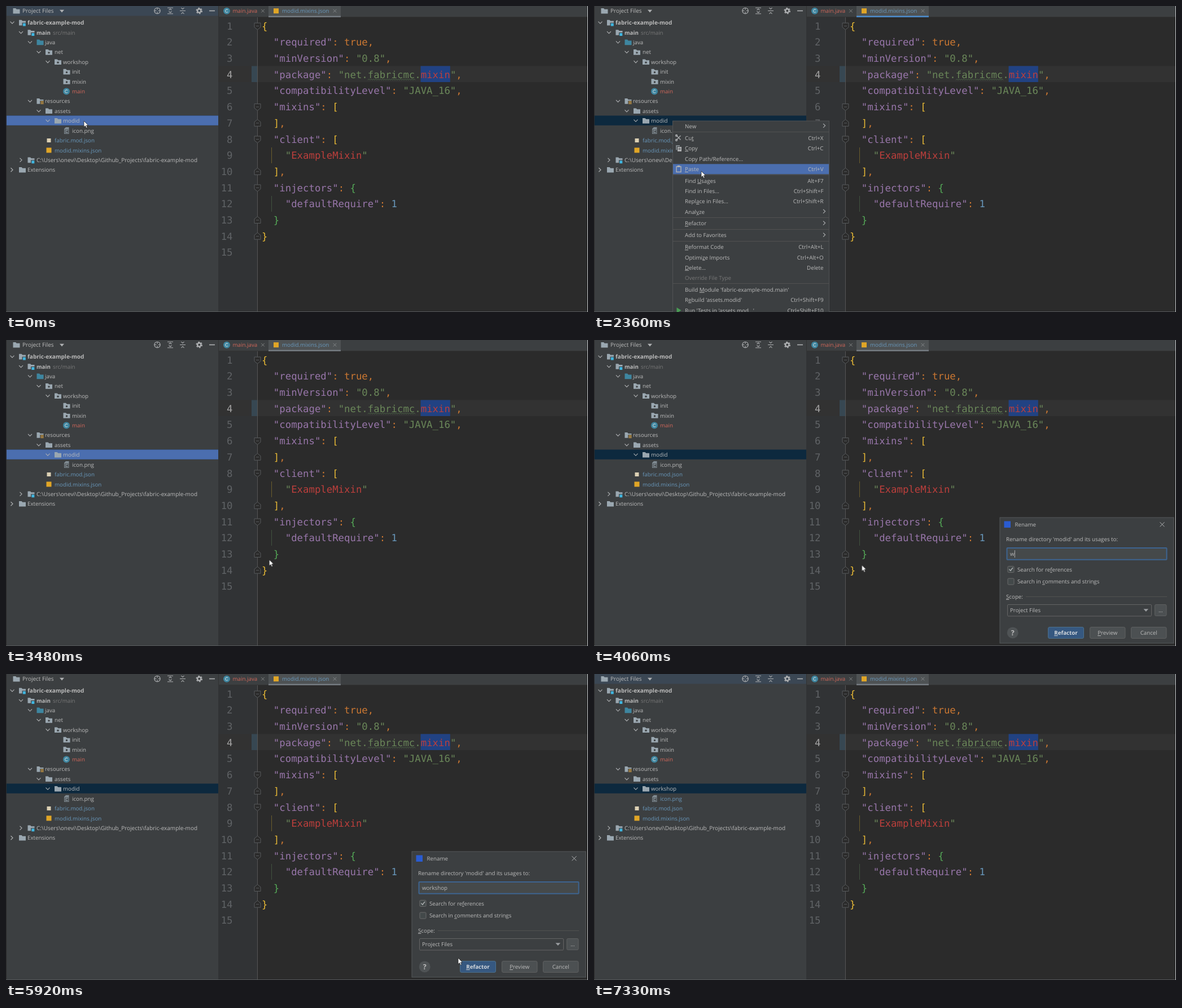
Animation, 1031 px wide and 543 px high, one loop 7350 ms. Source, as an HTML page:

```html
<!DOCTYPE html>
<html lang="en">
<head>
<meta charset="utf-8">
<title>Renaming a directory</title>
<style>
html, body { margin: 0; width: 100%; height: 100%; overflow: hidden; background: #2b2b2b; }
svg { display: block; width: 1031px; height: 543px; }
text { font: 9.75px "Open Sans", "Noto Sans", sans-serif; fill: #bbb; text-rendering: geometricPrecision; }
.code, .num { font: 17.33px "DejaVu Sans Mono", "Noto Sans Mono", monospace; }
.num { fill: #606366; text-anchor: end; }
.bold { font-weight: 700; }
.wide { font-size: 10px; }
.end { text-anchor: end; }
.mid { text-anchor: middle; }
.blue { fill: #6897bb; }
.red { fill: #d1675a; }
.dim { fill: #787878; }
.white { fill: #d4d8dc; }
.num.now { fill: #a4a3a3; }
.u { text-decoration: underline; }
.caret { font-size: 13px; }
.k { fill: #9876aa; } .o { fill: #cc7832; } .s { fill: #6a8759; } .r { fill: #bc3f3c; }
.y { fill: #e8ba36; } .g { fill: #54a857; } .n { fill: #6897bb; }
.line { fill: none; stroke: #afb1b3; stroke-width: 1.1; }
.step { animation: 7350ms step-end infinite; }
#dialog { transform-box: fill-box; transform-origin: center; animation: dialog 7350ms linear infinite; }
#cursor { animation: cursor 7350ms linear infinite; }
</style>
</head>
<body>
<script>
const LOOP = 7350;
let css = '', count = 0;
const pct = t => (t / LOOP * 100).toFixed(3) + '%';

// Visible only inside the given [from, to, from, to, ...] times
function show(body, ...times) {
  const name = 'v' + count++;
  const vis = on => `{visibility:${on ? 'visible' : 'hidden'}}`;
  css += `@keyframes ${name}{0%${vis(times[0] === 0)}` +
    times.map((t, i) => t < LOOP ? pct(t) + vis(i % 2 === 0) : '').join('') +
    `100%${vis(times[times.length - 1] === LOOP)}}`;
  return `<g class="step" style="animation-name:${name}">${body}</g>`;
}
function keyframes(name, list) {
  css += `@keyframes ${name}{${list.map(([t, rule]) => `${pct(t)}{${rule}}`).join('')}}`;
}

const rect = (x, y, w, h, fill, more = '') => `<rect x="${x}" y="${y}" width="${w}" height="${h}" fill="${fill}" ${more}/>`;
const box = (x, y, w, h, fill, stroke, r = 0) => rect(x + .5, y + .5, w - 1, h - 1, fill, `stroke="${stroke}" rx="${r}"`);
const line = (d, more = '') => `<path class="line" d="${d}" ${more}/>`;
const fill = (d, color) => `<path d="${d}" fill="${color}"/>`;
const disc = (x, y, r, color) => `<circle cx="${x}" cy="${y}" r="${r}" fill="${color}"/>`;
const plain = (x, cy, s, cls = '') => `<text x="${x}" y="${cy + 3.6}" class="${cls}">${s}</text>`;
// "_" marks the mnemonic letter
const label = (x, cy, s, cls) => plain(x, cy, s.replace(/_(\w)/, '<tspan class="u">$1</tspan>'), cls);

const down = (x, y) => line(`M${x - 3.5} ${y - 2}l3.5 3.6 3.5-3.6`);
const right = (x, y) => line(`M${x - 2} ${y - 3.5}l3.6 3.5-3.6 3.5`);
const cross = (x, y, r, color) => line(`M${x - r} ${y - r}l${2 * r} ${2 * r}m0-${2 * r}l-${2 * r} ${2 * r}`, `style="stroke:${color};stroke-width:1"`);
const folder = (x, y, color = '#9aa7b0') => fill(`M${x} ${y - 4.8}h4.6l1.6 1.8h5.8v7.8h-12z`, color);
const pack = (x, y) => folder(x, y) + disc(x + 6, y + 1, 1.7, '#3c3f41');
const module = (x, y) => folder(x, y) + rect(x + 5.6, y, 7, 6.5, '#3c3f41') + rect(x + 6.8, y + 1, 5, 5, '#40b6e0');
const resource = (x, y) => folder(x, y) + rect(x + 5.8, y - .8, 7, 7, '#3c3f41') +
  [0, 2, 4].map(i => rect(x + 6.8, y + i, 5.4, 1.1, '#d9a343')).join('');
const javaClass = (x, y) => disc(x, y, 6, '#3e86a0') + line(`M${x + 2.1} ${y - 1.7}a2.6 2.6 0 1 0 0 3.4`, 'style="stroke:#b9ccd4"');
const image = (x, y) => fill(`M${x + 4} ${y - 6}h5.5v12h-8.5v-9z`, '#7f8a91') + rect(x + 2, y - 2, 6.5, 7, '#4a4f52') +
  line(`M${x + 3} ${y - .5}h4.5m-4.5 2h2m-2 2h4.5`, 'style="stroke:#9aa7b0;stroke-width:1"');
const square = (x, y, color, size = 9) => rect(x, y - size / 2, size, size, color);

function tree() {
  const row = i => 29.6 + 17.41 * i;
  const y = row(10);
  const rows = [
    [38, 'fabric-example-mod', 'bold wide', module(23, row(0))],
    [54, 'main', 'bold', module(38.5, row(1)) + label(83, row(1), 'src/main', 'dim')],
    [69, 'java', '', folder(54.5, row(2), '#3e86a0')],
    [86, 'net', '', pack(70, row(3))],
    [101, 'workshop', '', pack(86, row(4))],
    [117, 'init', '', pack(101.5, row(5))],
    [117, 'mixin', '', pack(101.5, row(6))],
    [117, 'main', 'red', javaClass(107, row(7))],
    [69, 'resources', '', resource(54.5, row(8))],
    [86, 'assets', '', folder(70, row(9))],
    [101, '', '', folder(86, y)],
    [117, '', '', image(102, row(11))],
    [86, 'fabric.mod.json', 'blue', square(72.5, row(12), '#dbd0b4', 7)],
    [86, 'modid.mixins.json', 'blue', square(71.5, row(13), '#e0a526')],
    [54, 'C:\\Users\\onevi\\Desktop\\Github_Projects\\fabric-example-mod', 'wide', module(38.5, row(14))],
    [38, 'Extensions', '', folder(23, row(15))]
  ];
  const open = [[11, 0], [26.5, 1], [42.5, 2], [58, 3], [74, 4], [42.5, 8], [58, 9], [74, 10]];
  return rect(0, 0, 376, 543, '#3c3f41') +
    show(rect(1, 0, 375, 17.5, '#3b4754'), 0, 1170, 6290, LOOP) +
    folder(12.5, 8.8) + label(29, 8.8, 'Project Files', 'wide') + fill('M95 6.8h8l-4 4.8z', '#afb1b3') +
    line('M262.5 8.5h3.7m3.6 0h3.7M268 3v3.7m0 3.6V14') + `<circle class="line" cx="268" cy="8.5" r="5.2"/>` +
    line('M286 3.2h10M286 13.8h10M288.5 7.2l2.5-2 2.5 2M288.5 9.8l2.5 2 2.5-2') +
    line('M308 8.5h10M310.5 3.2l2.5 2.4 2.5-2.4M310.5 13.8l2.5-2.4 2.5 2.4') +
    `<circle class="line" cx="342.3" cy="8.5" r="3.2" style="stroke-width:2.4"/>` +
    `<circle class="line" cx="342.3" cy="8.5" r="5" style="stroke-width:1.6" stroke-dasharray="2.6 2.636"/>` +
    line('M360 8.5h10', 'style="stroke-width:1.6"') +
    rect(1, 194.5, 375, 17.3, '#0d293e') +
    show(rect(1, 194.5, 375, 17.3, '#4b6eaf'), 0, 1110, 3420, 3600, 6290, 7330) +
    open.map(([x, i]) => down(x, row(i))).join('') + right(26.5, row(14)) + right(10.5, row(15)) +
    rows.map(([x, s, cls, icon], i) => icon + plain(x, row(i), s, cls)).join('') +
    show(label(101, y, 'modid'), 0, 6290) + show(label(101, y, 'workshop'), 6290, LOOP) +
    show(label(117, row(11), 'icon.png'), 0, 6980) + show(label(117, row(11), 'icon.png', 'blue'), 6980, LOOP);
}

function editor() {
  const row = n => 35.6 + 28.7 * (n - 1);
  const code = [
    [0, 'y{'],
    [2, 'k"required"~o: true,'],
    [2, 'k"minVersion"~o: ~s"0.8"~o,'],
    [2, 'k"package"~o: ~s"net.fabricmc.~rmixin~s"~o,'],
    [2, 'k"compatibilityLevel"~o: ~s"JAVA_16"~o,'],
    [2, 'k"mixins"~o: ~y['],
    [2, 'y]~o,'],
    [2, 'k"client"~o: ~y['],
    [4, 's"~rExampleMixin~s"'],
    [2, 'y]~o,'],
    [2, 'k"injectors"~o: ~g{'],
    [4, 'k"defaultRequire"~o: ~n1'],
    [2, 'g}'],
    [0, 'y}'],
    [0, '']
  ];
  const spans = s => s && s.split('~').map(p => `<tspan class="${p[0]}">${p.slice(1)}</tspan>`).join('');
  const fold = (n, dir) => `<path d="M440 ${row(n) - 5.5 * dir}h11v${7.5 * dir}l-5.5 ${4.5 * dir}-5.5 ${-4.5 * dir}zM443 ${row(n)}h5" fill="#2b2b2b" stroke="#585b5d"/>`;
  return rect(376, 20, 655, 523, '#2b2b2b') + rect(376, 20, 69, 523, '#313335') +
    rect(376, 106.5, 655, 28.5, '#323232') + rect(435, 106.5, 10, 28.5, '#374752') +
    rect(445, 20, 1, 523, '#555555') + rect(734.5, 106.5, 52.3, 28.5, '#214283') +
    rect(470, 251, 1, 28, '#6b5d2d') + rect(470, 337, 1, 28, '#41523f') +
    [1, 6, 8, 11].map(n => fold(n, 1)).join('') + [7, 10, 13, 14].map(n => fold(n, -1)).join('') +
    line('M641 131.5' + 'l2-2 2 2'.repeat(21), 'style="stroke:#557a50;stroke-width:.7"') +
    code.map(([col, s], i) => {
      const y = row(i + 1) + 6;
      return `<text class="num${i === 3 ? ' now' : ''}" x="401.5" y="${y}">${i + 1}</text>` +
        `<text class="code" x="${453 + 10.43 * col}" y="${y}">${spans(s)}</text>`;
    }).join('') +
    rect(376, 0, 655, 20, '#3c3f41') + rect(376, 19, 655, 1, '#323232') + rect(376, 0, 1, 20, '#323232') +
    javaClass(391, 8.7) + label(401.5, 8.7, 'main.java', 'red') + cross(455, 8.7, 2.8, '#7f8182') +
    rect(465, 0, 128, 17.5, '#4e5254') + rect(465, 17.4, 128, 2.6, '#747a80') +
    show(rect(465, 17.4, 128, 2.6, '#4a88c7'), 1110, 3420) +
    square(474, 8.7, '#e0a526') + label(489, 8.7, 'modid.mixins.json', 'blue') + cross(582.5, 8.7, 2.8, '#84888a');
}

const sep = (x, y, w) => rect(x, y, w, 1, '#515151');
const hover = (x, cy, w, ...times) => show(rect(x, cy - 9, w, 18, '#4b6eaf'), ...times);

function menu() {
  const items = [
    [213, 'New', '>'], [234.2, 'Cu_t', 'Ctrl+X'], [252.6, '_Copy', 'Ctrl+C'], [271, 'Copy Path/Reference...'],
    [289.4, '_Paste', 'Ctrl+V'], [310, 'Find _Usages', 'Alt+F7'], [328.3, 'Find in Files...', 'Ctrl+Shift+F'],
    [346.6, 'Repl_ace in Files...', 'Ctrl+Shift+R'], [365, 'Anal_yze', '>'], [385.8, '_Refactor', '>'],
    [406.8, 'Add to Favorites', '>'], [427.8, '_Reformat Code', 'Ctrl+Alt+L'], [446, 'Optimi_ze Imports', 'Ctrl+Alt+O'],
    [464, '_Delete...', 'Delete'], [482.2, 'Override File Type', '', 'dim'],
    [503.2, "Build _Module 'fabric-example-mod.main'"], [521.6, "R_ebuild 'assets.modid'", 'Ctrl+Shift+F9'],
    [540, "R_un 'Tests in 'assets.mod...'", 'Ctrl+Shift+F10']
  ];
  const passed = [[213, 2270, 2300], [234.2, 2300, 2330], [271, 2330, 2360], [289.4, 2360, 2390],
    [310, 2390, 2420], [346.6, 2420, 2450], [365, 2450, 2490]];
  return box(139, 203.5, 278, 360, '#3c3f41', '#515355') +
    [223, 299, 375, 396, 417, 492].map(y => sep(140, y, 276)).join('') +
    passed.map(([cy, a, b]) => hover(140, cy, 276, a, b)).join('') + hover(140, 385.8, 272, 2490, 3420) +
    items.map(([cy, s, key = '', cls = '']) => label(161, cy, s, cls) +
      (key === '>' ? right(408, cy - .7) : label(406.5, cy, key, 'end'))).join('') +
    line('M145.5 229l8 8.5M145.5 238.5l8-8.5') + `<circle class="line" cx="146" cy="230" r="1.6"/><circle class="line" cx="146" cy="238" r="1.6"/>` +
    rect(145, 247, 7, 8.5, '#7f8689') + rect(147, 249, 8.5, 9.5, '#3c3f41') + rect(148, 250, 7, 8, '#afb1b3') +
    line('M149.5 252.5h4m-4 2h4', 'style="stroke:#3c3f41;stroke-width:.8"') +
    line('M146 285h8v9.5h-8z', 'style="stroke-width:1.4"') + rect(147.8, 283, 4.4, 3, '#afb1b3') +
    fill('M146.5 535l8 5-8 5z', '#499c54');
}

function submenu() {
  const items = [[384.3, '_Rename...', 'Shift+F6'], [405, '_Move Directory...', 'F6'], [423.2, 'Copy Classes...', 'F5'],
    [444, 'Convert Raw Types to Generics...'], [464.8, 'Migrate to AndroidX...'], [483.3, 'Add Right-to-Left (RTL) Support...']];
  return box(412.5, 373.5, 194, 120, '#3c3f41', '#515355') +
    [394, 433, 454].map(y => sep(414, y, 191)).join('') + hover(413.5, 384.3, 191.5, 3090, 3420) +
    items.map(([cy, s, key = '']) => label(433.5, cy, s) + label(595.5, cy, key, 'end')).join('');
}

function dialog() {
  const button = (x, w, s, bg, edge, cls) => box(x, 509, w, 21, bg, edge, 2.5) + label(x + w / 2, 519.6, s, 'mid ' + cls);
  const check = cy => box(732.5, cy - 6, 12, 12, '#43494a', '#6b6b6b', 1.5);
  const typed = [['w', 3940], ['wo', 4180], ['wor', 4230], ['work', 4270], ['works', 4460], ['worksh', 4520], ['worksho', 4990], ['workshop', 5050]];
  return box(718.5, 314.5, 309, 224, '#3c3f41', '#55585a') +
    rect(726.5, 321.5, 11.5, 11.5, '#2a5bd0') + label(745.5, 327.5, 'Rename') + cross(1006.5, 327.3, 4, '#b4b6b8') +
    label(730, 353.4, "Rename directory 'modid' and its usages to:") +
    rect(731.5, 369, 283, 20.7, '#45494a', 'stroke="#3d6490" stroke-width="2" rx="1"') +
    show(rect(736.5, 373, 30, 13.5, '#2f65ca') + label(737, 379.6, 'modid'), 3560, 3940) +
    typed.map(([s, t], i) => {
      const caret = '<tspan class="caret" dx="-2.8">|</tspan>';
      const next = typed[i + 1];
      return next ? show(label(737, 379.6, s + caret), t, next[1])
        : show(label(737, 379.6, s + caret), t, 5700) + show(label(737, 379.6, s), 5700, 6370);
    }).join('') +
    check(407) + check(428.6) + line('M735.5 406.8l2.4 2.6 4-5.4', 'style="stroke-width:1.5"') +
    label(750, 407.3, 'Search for re_ferences') + label(750, 428.8, 'Search in _comments and strings') +
    label(730, 455.4, '_Scope:') + rect(765, 455, 250, 1, '#515151') +
    box(732, 469, 256, 21.5, '#3c3f41', '#646464', 1.5) + label(737, 479.8, 'Project Files') + fill('M973.5 477.3h8.6l-4.3 4.8z', '#9a9da0') +
    box(993, 469, 21.5, 21, '#4c5052', '#5e6060', 2) + label(1003.8, 479.5, '...', 'mid') +
    disc(741.7, 519.4, 10, '#4f5355') + `<text class="mid bold" x="741.7" y="524" style="font-size:12.5px">?</text>` +
    button(804, 64, '_Refactor', '#365880', '#4c708c', 'bold white') +
    button(878, 63.5, '_Preview', '#4c5052', '#5e6060', '') + button(951, 63.5, 'Cancel', '#4c5052', '#5e6060', '') +
    show(button(804, 64, '_Refactor', '#3c3f41', '#5e6060', 'bold dim') + button(878, 63.5, '_Preview', '#3c3f41', '#5e6060', 'dim'), 3560, 4060);
}

const gone = 'opacity:0;transform:scale(.96)', here = 'opacity:1;transform:none';
keyframes('dialog', [[0, gone], [3560, gone], [3680, here], [6210, here], [6350, gone], [LOOP, gone]]);

// Time and position of the pointer tip
const path = [
  [0, 138, 204], [30, 138, 204], [60, 140, 204.5], [1810, 140, 204.5], [1900, 145, 204.5],
  [2270, 145, 205], [2300, 156, 232], [2330, 174, 265], [2360, 190, 293], [2389, 190, 293],
  [2490, 210, 382], [2600, 235, 386], [2700, 290, 387], [2850, 385, 391], [3000, 441, 399.5], [3029, 441, 399.5],
  [3110, 452, 390], [3270, 464, 387], [3420, 464, 387], [3690, 474.5, 399.5],
  [5580, 474.5, 399.5], [5740, 645, 455], [5920, 801, 504], [5979, 801, 504], [6110, 829, 525],
  [6590, 829, 525], [6710, 890, 535], [6830, 954, 546], [LOOP, 954, 546]
];
keyframes('cursor', path.map(([t, x, y]) => [t, `transform:translate(${x}px,${y}px)`]));

const scene = tree() + editor() +
  rect(0, 0, 1, 543, '#2b2b2b') + rect(0, 542, 1031, 1, '#55585a') + rect(1030, 0, 1, 543, '#c4c6c8') +
  show(menu(), 1110, 3420) + show(submenu(), 2730, 3420) +
  `<g id="dialog">${dialog()}</g>` +
  show('<path id="cursor" d="M0 0v10.8l2.5-2.3 1.7 3.9 1.9-.8-1.7-3.8h3.4z" fill="#fff" stroke="#1b1b1b" stroke-width=".7"/>', 0, 6830);

document.body.innerHTML = `<style>${css}</style><svg viewBox="0 0 1031 543">${scene}</svg>`;
</script>
</body>
</html>
```
